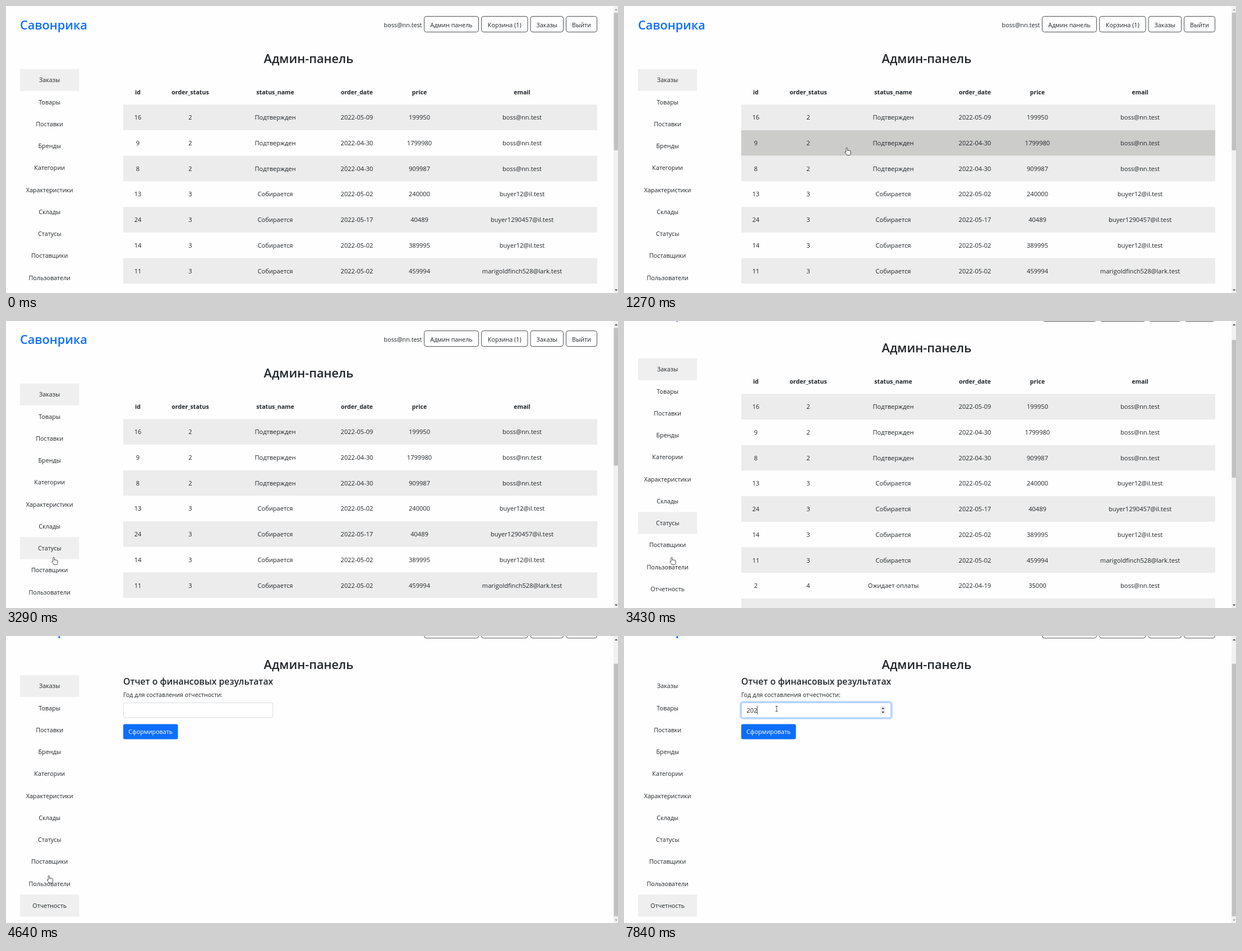
Recreate the animation shown at these times as an HTML page. Size 1091 by 513 pixels, loop 8 s.

```html
<!DOCTYPE html>
<html lang="ru">
<head>
<meta charset="utf-8">
<style>
html, body { margin: 0; width: 100%; height: 100%; overflow: hidden; background: #fefefe; }
svg { display: block; width: 1091px; height: 513px; font-family: "Open Sans", "Noto Sans", sans-serif; fill: #212529; }
</style>
</head>
<body>
<svg id="stage" viewBox="0 0 1091 513"></svg>
<script>
const DURATION = 8000, STEP = 68;
const ROW_TOP = 176.3, ROW_H = 45.7, ITEM_TOP = 112.6, ITEM_H = 39.25;
const REPORT_AT = 4640, REPORT_SCROLL = 42.8;

const columns = [235, 328.5, 480, 625.5, 737, 920];
const header = ['id', 'order_status', 'status_name', 'order_date', 'price', 'email'];
const statuses = { 2: 'Подтвержден', 3: 'Собирается', 4: 'Ожидает оплаты' };
const boss = 'boss@nn.test', buyer = 'buyer12@il.test';
const orders = [
  [16, 2, '05-09', 199950, boss],
  [9, 2, '04-30', 1799980, boss],
  [8, 2, '04-30', 909987, boss],
  [13, 3, '05-02', 240000, buyer],
  [24, 3, '05-17', 40489, 'buyer1290457@il.test'],
  [14, 3, '05-02', 389995, buyer],
  [11, 3, '05-02', 459994, 'marigoldfinch528@lark.test'],
  [2, 4, '04-19', 35000, boss],
  [4, 4, '04-28', 454545, 'boss2'],
];
const menu = ['Заказы', 'Товары', 'Поставки', 'Бренды', 'Категории', 'Характеристики',
  'Склады', 'Статусы', 'Поставщики', 'Пользователи', 'Отчетность'];
const buttons = [['Админ панель', 745, 843], ['Корзина (1)', 847, 930.5], ['Заказы', 934.5, 994], ['Выйти', 998, 1054]];

// Pointer moves: start time, number of steps, evenly timed waypoints.
const moves = [
  [390, 6, [430, 520], [415, 400], [402, 283]],
  [1200, 6, [402, 283], [397, 253], [394, 247], [392, 245]],
  [1880, 11, [392, 245], [330, 262], [215, 300], [132, 333], [100, 362], [88, 394]],
  [2760, 4, [88, 394], [85, 422]],
  [4100, 3, [85, 422], [76.5, 428]],
  [5110, 12, [76.5, 428], [110, 405], [190, 330], [280, 245], [335, 205], [285, 158], [275, 140]],
  [5940, 3, [275, 140], [272, 130]],
];
const cursors = {
  hand: 'M-1.2 8V1.6a1.2 1.2 0 0 1 2.4 0V5.4a1 1 0 0 1 2 .3a1 1 0 0 1 2 .4a1 1 0 0 1 1.8 .8V10q0 2-1.2 3.5H.2Q-.5 11.5-2.8 9.2q-.8-1.6.3-1.7z',
  arrow: 'M0 0V9L2 7.2L3.4 10.4L4.8 9.8L3.4 6.7H6.2Z',
  beam: 'M-2-4.5H2M0-4.5V4.5M-2 4.5H2',
};

const clamp = v => Math.max(0, Math.min(1, v));
const stepsDone = (t, start, n) => t < start ? 0 : Math.min(n, Math.floor((t - start) / STEP) + 1);
const mix = (a, b, p) => `rgb(${a.map((v, i) => Math.round(v + (b[i] - v) * p))})`;

function text(str, x, y, { size = 10.75, weight = 400, anchor = 'middle', fill = '#212529', id = '' } = {}) {
  return `<text id="${id}" x="${x}" y="${y + size * .36}" font-size="${size}" font-weight="${weight}" text-anchor="${anchor}" fill="${fill}">${str}</text>`;
}
function rect(x, y, w, h, attrs = '') {
  return `<rect x="${x}" y="${y}" width="${w}" height="${h}" ${attrs}/>`;
}

const heading = { size: 21.7, weight: 600 };
const left = { anchor: 'start' };
const data = { size: 11.1 };

const topBar = text('Савонрика', 25, 34, { ...heading, ...left, fill: '#0d6efd' }) + text(boss, 707.5, 34)
  + buttons.map(([label, x1, x2]) =>
    rect(x1 + .5, 18.5, x2 - x1 - 1, 28, 'rx="4" fill="none" stroke="#212529" stroke-width=".8"')
    + text(label, (x1 + x2) / 2, 34)).join('');

const sidebar = menu.map((label, i) => {
  const y = ITEM_TOP + i * ITEM_H;
  return rect(25, y, 105.5, ITEM_H, 'class="item"') + text(label, 77.7, y + ITEM_H / 2 + .2);
}).join('');

const table = header.map((h, i) => text(h, columns[i], 154, { size: 10.6, weight: 700 })).join('')
  + orders.map(([id, status, day, price, email], r) => {
    const y = ROW_TOP + r * ROW_H;
    const cells = [id, status, statuses[status], '2022-' + day, price, email];
    return rect(209, y, 845, ROW_H, 'class="row"')
      + cells.map((c, i) => text(c, columns[i], y + ROW_H / 2 + .2, data)).join('');
  }).join('');

const report = text('Отчет о финансовых результатах', 209, 81.5, { ...left, size: 15.8, weight: 600 })
  + text('Год для составления отчестности:', 209, 105.5, left)
  + rect(207.6, 117.6, 270, 30, 'id="glow" rx="4.5" fill="none" stroke="#0d6efd" stroke-width="3"')
  + rect(209.4, 119.4, 266.4, 26.6, 'id="field" rx="3" fill="#fff" stroke-width=".8"')
  + text('', 218.5, 133, { ...left, ...data, id: 'year' })
  + rect(0, 125, .8, 15, 'id="caret"')
  + `<g id="spinner">${rect(457, 125, 9.5, 15, 'fill="#efefef"')}<path d="M459 130.5l2.7-3l2.7 3zM459 135l2.7 3l2.7-3z" fill="#444"/></g>`
  + rect(209, 157.5, 97.5, 26.9, 'id="submit" rx="3"')
  + text('Сформировать', 257.7, 171.5, { fill: '#fff' });

const stage = document.getElementById('stage');
stage.innerHTML = `<g id="page">${topBar}${text('Админ-панель', 539.5, 94.3, heading)}${sidebar}
  <g id="table">${table}</g><g id="report" transform="translate(0 ${REPORT_SCROLL})">${report}</g></g>
  ${rect(1083, 0, 8, 513, 'fill="#f1f1f1"')}${rect(1083.6, 0, 7.4, 0, 'id="thumb" fill="#c1c1c1"')}
  <path id="up" d="M1085 8l2.7-3l2.7 3z"/><path id="down" d="M1085 506.5l2.7 3l2.7-3z"/>
  <circle id="click" r="8.5" fill="#ff0" opacity=".47"/>
  <path id="pointer" fill="#fff" stroke="#222" stroke-width=".8" stroke-linejoin="round"/>`;

const el = {};
stage.querySelectorAll('[id]').forEach(node => { if (node.id) el[node.id] = node; });
const rows = stage.querySelectorAll('.row'), items = stage.querySelectorAll('.item');
const set = (node, attrs) => { for (const k in attrs) node.setAttribute(k, attrs[k]); };
const show = (node, on) => set(node, { visibility: on ? 'visible' : 'hidden' });

function pointerAt(t) {
  const move = moves.filter(m => t >= m[0]).pop();
  if (!move) return [-99, -99];
  const [start, n, ...points] = move;
  const along = stepsDone(t, start, n) / n * (points.length - 1);
  const i = Math.min(points.length - 2, Math.floor(along)), f = along - i;
  return points[i].map((v, k) => v + (points[i + 1][k] - v) * f);
}

function scrollAt(t) {
  if (t >= REPORT_AT) return REPORT_SCROLL;
  const u = clamp((stepsDone(t, 3290, 6) - .7) / 4.6);
  return Math.round(92 * u * u * (3 - 2 * u));
}

function draw(t) {
  const onReport = t >= REPORT_AT;
  const scroll = scrollAt(t), [px, py] = pointerAt(t);
  set(el.page, { transform: `translate(0 ${-scroll})` });
  show(el.table, !onReport);
  el.report.style.display = onReport ? '' : 'none';

  // Hover is only re-evaluated once the pointer moves after a scroll.
  const docY = py + (t < 4100 ? 0 : t < 4710 ? 92 : REPORT_SCROLL);
  const overRow = !onReport && px > 209 && px < 1054 ? Math.floor((docY - ROW_TOP) / ROW_H) : -1;
  const overItem = px > 25 && px < 130.5 ? Math.floor((docY - ITEM_TOP) / ITEM_H) : -1;
  const active = t < 4710 ? 0 : 10;
  rows.forEach((row, i) => set(row, { fill: i === overRow ? '#cccccb' : i % 2 ? 'none' : '#ececec' }));
  items.forEach((item, i) => set(item, { fill: i === overItem || i === active ? '#efefef' : 'none' }));

  const focus = stepsDone(t, 6290, 3) / 3;
  const dark = clamp(Math.min((t - 5660) / 200, (6010 - t) / 200));
  const typed = [7040, 7310, 7840].filter(at => t >= at).length;
  set(el.glow, { opacity: focus * .25 });
  set(el.field, { stroke: mix([206, 212, 218], [134, 183, 254], focus) });
  set(el.submit, { fill: mix([13, 110, 253], [11, 94, 215], dark) });
  set(el.caret, { x: 218.4 + typed * 6.3 });
  el.year.textContent = '202'.slice(0, typed);
  show(el.caret, t >= 6290 && (t < 6840 || t >= 7040));
  show(el.spinner, t >= 5940);

  const pageHeight = onReport ? 513 + REPORT_SCROLL : 1020;
  set(el.thumb, { y: 12 + scroll / pageHeight * 489, height: 513 / pageHeight * 489 });
  set(el.up, { fill: scroll ? '#505050' : '#a3a3a3' });
  set(el.down, { fill: onReport ? '#a3a3a3' : '#505050' });

  const inField = onReport && px > 209 && px < 476 && py > 119 && py < 146;
  const onSubmit = onReport && px > 209 && px < 306 && py > 157.5 && py < 184;
  const kind = inField ? 'beam' : overRow >= 0 || overItem >= 0 || onSubmit ? 'hand' : 'arrow';
  const at = `translate(${px} ${py})`;
  set(el.pointer, { d: cursors[kind], transform: at });
  set(el.click, { transform: at });
  show(el.click, (t >= 4240 && t < 4440) || (t >= 6290 && t < 6570));
}

function tick() {
  draw(performance.now() % DURATION);
  requestAnimationFrame(tick);
}
tick();
</script>
</body>
</html>
```
